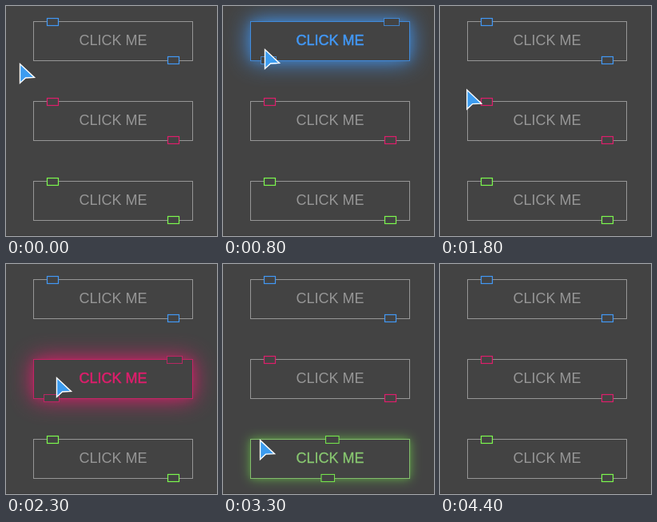
Write an HTML page that moves like this. It is 264x288 px and loops after 4700 ms.

```html
<!DOCTYPE html>
<html lang="en">
<head>
<meta charset="utf-8">
<title>Glowing buttons</title>
<style>
  html, body { margin: 0; width: 264px; height: 288px; overflow: hidden; background: #434343; }
  svg { display: block; }
  text { font: 18px "Liberation Sans", Arial, sans-serif; text-anchor: middle; }
</style>
</head>
<body>
<svg id="stage" width="264" height="288" viewBox="0 0 264 288"></svg>
<script>
const LOOP = 4700, STEP = 100, FADE = 300;
const SETTLE = 250, LEAD = 100, RETREAT = 500;
const BACK = '#434343', IDLE = '#969696';
const stage = document.getElementById('stage');

// spot: where the pointer rests on the button; away: where it retreats to
const visits = [
  { color: '#4298f6', enter: 250, leave: 1100, spot: [52, 54], away: [5, 69] },
  { color: '#de1e6c', enter: 1860, leave: 2400, spot: [63, 142], away: [0, 175] },
  { color: '#7cfa4e', enter: 3210, leave: 4060, spot: [54, 228], away: [40, 310] }
];
const origin = [17, 72];

const lerp = (a, b, p) => a + (b - a) * p;
const clamp = v => Math.min(1, Math.max(0, v));
const between = (a, b, p) => a.map((v, i) => lerp(v, b[i], p));
const easeInOut = p => p * p * (3 - 2 * p);
const easeOut = p => 1 - (1 - p) ** 3;
const mix = (a, b, p) => `color-mix(in srgb, ${b} ${p * 100}%, ${a})`;

function set(node, attrs) {
  for (const key in attrs) node.setAttribute(key, attrs[key]);
  return node;
}

function add(tag, attrs) {
  const node = document.createElementNS('http://www.w3.org/2000/svg', tag);
  return stage.appendChild(set(node, attrs));
}

// CSS "ease": cubic-bezier(.25, .1, .25, 1)
function ease(x) {
  if (x <= 0 || x >= 1) return clamp(x);
  const curve = (a, b, s) => 3 * a * s * (1 - s) ** 2 + 3 * b * s * s * (1 - s) + s ** 3;
  let low = 0, high = 1;
  for (let i = 0; i < 24; i++) {
    const mid = (low + high) / 2;
    if (curve(0.25, 0.25, mid) < x) low = mid; else high = mid;
  }
  return curve(0.1, 1, low);
}

function makeButton({ color, enter, leave }, index) {
  const y = 19 + 100 * index;
  const glow = (blur, alpha) => ({
    blur, alpha, node: add('rect', { x: 34, y, width: 200, height: 50, fill: color })
  });
  const glows = [glow(15, 0.95), glow(6, 0.3)];
  const border = add('rect', { x: 34.5, y: y + 0.5, width: 199, height: 49, fill: BACK });
  const label = add('text', { x: 134, y: y + 30 });
  label.textContent = 'CLICK ME';
  const tab = top => add('rect', { y: top, height: 9, fill: BACK, stroke: color });
  const upper = tab(y - 3.5), lower = tab(y + 44.5);

  return time => {
    const p = ease((time - enter) / FADE) - ease((time - leave) / FADE);
    for (const { node, blur, alpha } of glows) {
      node.style.filter = `blur(${blur * p}px)`;
      node.style.opacity = alpha * p;
    }
    const tint = mix(IDLE, color, p);
    border.style.stroke = tint;
    set(border, { 'stroke-opacity': lerp(1, 0.8, p) });
    label.style.fill = label.style.stroke = tint;
    set(label, { 'stroke-width': 0.5 * p });

    const width = lerp(14, 19, p), left = lerp(51.5, 201.5, p);
    const outline = { width, 'stroke-width': lerp(1.2, 1, p), 'stroke-opacity': lerp(1, 0.75, p) };
    set(upper, { x: left, ...outline });
    set(lower, { x: 268 - left - width, ...outline });
  };
}

const buttons = visits.map(makeButton);
add('rect', { y: 287, width: 264, height: 1, fill: '#3b3b3b' });
const pointer = add('path', {
  d: 'M.5 .5V24.5L7.5 18L18.5 17.5Z', fill: '#3c9cf0', stroke: '#fff', 'stroke-width': 1.4
});

// Approach each spot, rest there, then back off before the next visit
function pointerAt(time) {
  let from = origin, begin = 0;
  for (const { enter, leave, spot, away } of visits) {
    const arrive = enter + SETTLE, depart = leave - LEAD;
    if (time < arrive) return between(from, spot, easeInOut((time - begin) / (arrive - begin)));
    if (time < depart + RETREAT) return between(spot, away, easeOut(clamp((time - depart) / RETREAT)));
    from = away;
    begin = depart + RETREAT;
  }
  return from;
}

function draw(time) {
  buttons.forEach(update => update(time));
  set(pointer, { transform: `translate(${pointerAt(time)})` });
}

const start = performance.now();
function tick() {
  const time = (performance.now() - start) % LOOP;
  draw(Math.floor(time / STEP) * STEP);
  requestAnimationFrame(tick);
}
tick();
</script>
</body>
</html>
```
